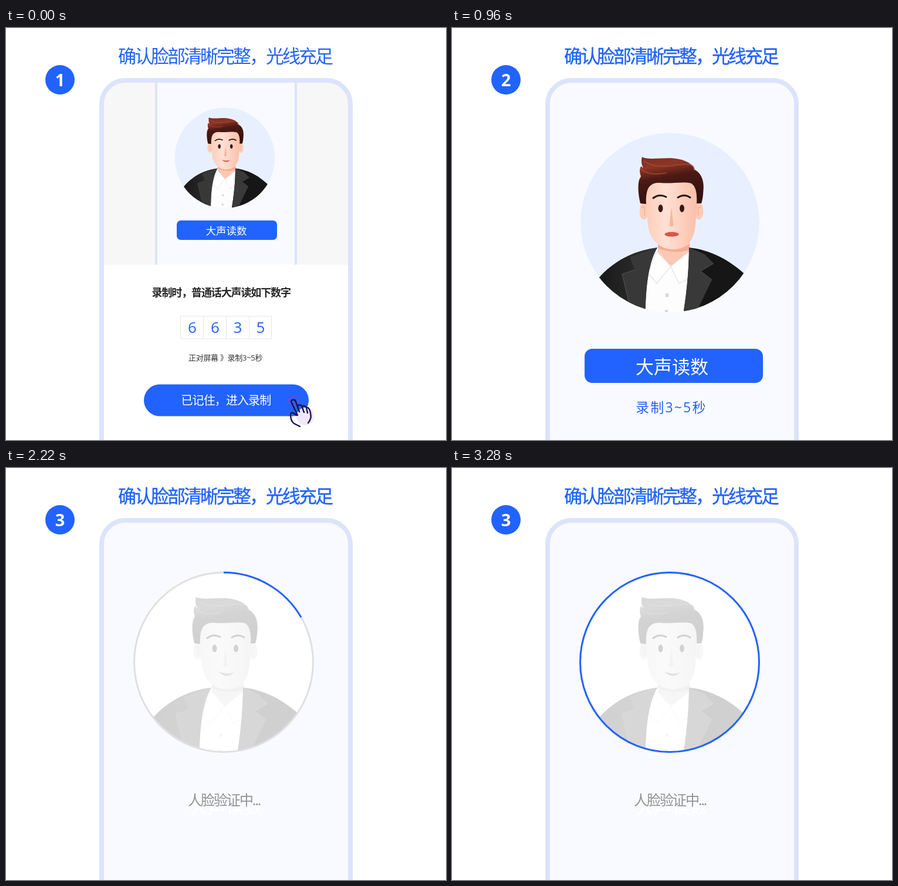
An HTML page that plays this animation: 750 px wide and 700 px high, repeating every 3.61 s.

```html
<!DOCTYPE html>
<html lang="zh-CN">
<head>
<meta charset="utf-8">
<title>录制步骤</title>
<style>
html, body { margin: 0; width: 100%; height: 100%; overflow: hidden; background: #fff; }
svg { display: block; width: 750px; height: 700px; }
text { font-family: "Open Sans", "Noto Sans CJK SC", "Noto Sans CJK", sans-serif; white-space: pre; }
.blue { fill: #2263ff; }
.white { fill: #fff; }
.line { fill: none; stroke-linecap: round; stroke-linejoin: round; }
.grey { filter: grayscale(1); opacity: .2; }
#title { font-size: 31px; letter-spacing: -3px; stroke: #2263ff; }
#badge { font-size: 29px; font-weight: 700; text-anchor: middle; }
</style>
</head>
<body>
<svg viewBox="0 0 750 700">
<defs>
  <linearGradient id="hair" x1="0" y1="0" x2=".25" y2="1">
    <stop offset="0" stop-color="#7c2a1d"/><stop offset=".25" stop-color="#8e3626"/>
    <stop offset=".5" stop-color="#4b1a14"/><stop offset="1" stop-color="#34100e"/>
  </linearGradient>
  <linearGradient id="skin">
    <stop offset="0" stop-color="#fdcdb9"/><stop offset=".4" stop-color="#ffe0d4"/>
    <stop offset="1" stop-color="#fabfa8"/>
  </linearGradient>
  <linearGradient id="cloth">
    <stop offset="0" stop-color="#151515"/><stop offset="1" stop-color="#343434"/>
  </linearGradient>
  <clipPath id="small"><circle cx="373" cy="220.5" r="85.5"/></clipPath>
  <clipPath id="large"><circle cx="371.5" cy="330.5" r="152.5"/></clipPath>
  <clipPath id="screen"><rect x="163" y="89" width="424" height="700" rx="40"/></clipPath>

  <g id="person">
    <path fill="#fdfdfd" d="M350 373L404 373L404 520H326V420Z"/>
    <path fill="#fbc8b3" d="M351 360V380L373 406L405 380V360Z"/>
    <path fill="#f5ac92" d="M351 367Q378 384 405 367V377Q378 385 351 374Z"/>
    <path fill="#fff" stroke="#e2e2e2" stroke-width="1.2" d="M349 379L334 416L349 434L373 405ZM405 379L403 425L387 434L373 405Z"/>
    <path fill="#d6d6d6" d="M364 451h5v6h-5zM363 479h5v6h-5z"/>
    <path fill="url(#cloth)" d="M350 373C310 378 268 397 238 440V520H329C330 470 328 410 350 373Z"/>
    <path fill="#383838" d="M350 373L303 389L312 411L290 418L302 468L308 520H329C330 480 328 410 350 373Z"/>
    <path class="line" stroke="#555" d="M312 411L290 418L302 468"/>
    <path fill="#161616" d="M404 373C440 377 475 394 505 424L520 520H388C398 470 404 420 404 373Z"/>
    <path fill="#393939" d="M404 373L430 384L446 400L424 413L443 428L408 500L402 520H388C398 470 404 420 404 373Z"/>
    <path class="line" stroke="#505050" d="M446 400L424 413L443 428"/>
    <g fill="#fdcbb7">
      <ellipse cx="327" cy="311" rx="7.5" ry="14.5"/><ellipse cx="421" cy="311" rx="7.5" ry="14.5"/>
    </g>
    <path class="line" stroke="#f4ad94" stroke-width="1.5" d="M324 305Q330 301 328 318M424 305Q418 301 420 318"/>
    <path fill="url(#skin)" d="M330 300C329 268 338 258 355 258H398C412 258 418 272 418 300L415 332C414 358 402 376 377 376C351 376 336 356 334 334Z"/>
    <path fill="url(#hair)" d="M324 219C332 224 350 221 372 221C395 222 410 230 414 241C424 246 430 258 428.500 275C428 288 426 295 425 298L417 298C418 283 416 269 408 264C395 260 375 265 355 263C342 262 334 268 332 280C330 290 331 296 331 299L321 298C318 285 316 270 319 258L322 252C320 247 319 241 322 235L326 238C323 232 322 225 324 219Z"/>
    <path class="line" stroke="#b0503a" stroke-width="2" opacity=".65" d="M327 226Q345 239 380 233T412 241M323 240Q335 252 365 246"/>
    <path class="line" stroke="#2b1512" stroke-width="3" d="M343 289Q353 281 365 287M385 288Q396 281 406 288"/>
    <g fill="#3b1814">
      <ellipse cx="355.500" cy="306.500" rx="4" ry="6.500"/><ellipse cx="392" cy="306.500" rx="4" ry="6.500"/>
    </g>
    <path fill="#f7b49c" d="M374 304L370.500 335Q374 340 377.500 335Z"/>
  </g>
  <g id="smiling">
    <use href="#person"/>
    <path fill="#d9584b" d="M362 346Q376 352 389 347Q376 360 362 346Z"/>
  </g>
</defs>

<rect width="750" height="700" fill="#fff"/>
<text id="title" class="blue" x="191" y="59">确认脸部清晰完整，光线充足</text>
<circle class="blue" cx="92" cy="88" r="25"/>
<text id="badge" class="white" x="92" y="99"></text>
<rect x="163" y="89" width="424" height="700" rx="40" fill="#f9faff"/>

<g class="scene">
  <g clip-path="url(#screen)">
    <rect x="163" y="89" width="424" height="313" fill="#f7f7f7"/>
    <rect x="254" y="89" width="242" height="313" fill="#dce4fb"/>
    <rect x="258" y="89" width="234" height="313" fill="#f9faff"/>
    <rect class="white" x="163" y="402" width="424" height="300"/>
  </g>
  <g clip-path="url(#small)">
    <circle cx="373" cy="220.500" r="85.500" fill="#e8f0ff"/>
    <use href="#smiling" transform="translate(163.700 28.800) scale(.5625)"/>
  </g>
  <rect class="blue" x="291" y="327" width="171" height="33" rx="7"/>
  <text class="white" x="340.500" y="350.500" font-size="17.500">大声读数</text>
  <text x="248.500" y="456" font-size="18" font-weight="700" letter-spacing="-1.120" fill="#262626">录制时，普通话大声读如下数字</text>
  <path fill="none" stroke="#e6e6e6" d="M297.500 489.500H452.500V528H297.500ZM336.500 489.500V528M375.500 489.500V528M414.500 489.500V528"/>
  <g class="blue" font-size="26" text-anchor="middle">
    <text x="317.500" y="518">6</text><text x="356.500" y="518">6</text>
    <text x="395" y="518">3</text><text x="434" y="518">5</text>
  </g>
  <text x="311" y="565" font-size="13" letter-spacing="-.300" fill="#333">正对屏幕 》录制3~5秒</text>
  <rect class="blue" x="235" y="605.500" width="281" height="54" rx="27"/>
  <text class="white" x="298.500" y="640" font-size="20" letter-spacing="-.900">已记住，进入录制</text>
  <g id="hand">
    <circle cx="510" cy="660" r="15" fill="#f1e7fd"/>
    <circle id="ripple" cx="490" cy="634" r="8" fill="none" stroke="#b62fb4" stroke-width="2" stroke-dasharray="2 1.500" opacity=".8"/>
    <path class="line" stroke="#1b124f" stroke-width="2.400" d="M497 658L487 637Q485 632 489 631.500Q493 631 494 635L500 652M497 643Q500 638 504 642L508 653M505 643Q509 640 512 645L514 654M512 645Q516 644 518 650C521 660 520 665 515 671M495 658Q486 650 485 656Q485 668 491 672L501 677"/>
  </g>
</g>

<g class="scene">
  <g clip-path="url(#large)">
    <circle cx="371.500" cy="330.500" r="152.500" fill="#e8f0ff"/>
    <use href="#person"/>
    <ellipse id="mouth" cx="374.500" cy="350.500" fill="#d4574f"/>
  </g>
  <rect class="blue" x="226" y="545" width="304" height="58" rx="13"/>
  <text class="white" x="313" y="586.500" font-size="31">大声读数</text>
  <text class="blue" x="313" y="652.500" font-size="23" letter-spacing="2.200">录制3~5秒</text>
</g>

<g class="scene">
  <circle class="white" cx="371" cy="330" r="152.500"/>
  <g clip-path="url(#large)"><use class="grey" href="#smiling"/></g>
  <g fill="none" stroke-width="3" transform="rotate(-90 371 330)">
    <circle cx="371" cy="330" r="152.500" stroke="#e0e0e0"/>
    <circle id="arc" cx="371" cy="330" r="152.500" stroke="#2263ff" pathLength="6"/>
  </g>
  <text class="white" x="313" y="586.500" font-size="31">大声读数</text>
  <rect x="300" y="545" width="150" height="32" fill="#f9faff"/>
  <text x="310" y="573" font-size="24" letter-spacing="-2" fill="#929292">人脸验证中...</text>
</g>

<rect x="163" y="89" width="424" height="700" rx="40" fill="none" stroke="#dce4fb" stroke-width="8"/>
</svg>
<script>
const $ = id => document.getElementById(id);
const set = (el, attrs) => { for (const k in attrs) el.setAttribute(k, attrs[k]); };
const scenes = [...document.querySelectorAll('.scene')];
const LOOP = 3610, start = performance.now();
const passed = (t, times) => times.filter(s => t >= s).length;

function draw() {
  const t = (performance.now() - start) % LOOP;
  const step = passed(t, [960, 2220]);
  scenes.forEach((s, i) => s.style.display = i === step ? '' : 'none');
  $('badge').textContent = step + 1;
  $('title').style.strokeWidth = t < 300 ? 0 : .4;

  const lifted = t >= 300 && t < 630;
  set($('hand'), { transform: lifted ? 'translate(8 8)' : '' });
  set($('ripple'), { visibility: lifted ? 'hidden' : 'inherit' });

  const open = passed(t, [1290, 1620, 1890]) % 2;
  set($('mouth'), open ? { rx: 9, ry: 6 } : { rx: 12, ry: 4 });

  const sixths = 1 + passed(t, [2420, 2620, 2850, 3080, 3280]);
  set($('arc'), { 'stroke-dasharray': sixths < 6 ? sixths + ' 6' : 'none' });
  requestAnimationFrame(draw);
}
draw();
</script>
</body>
</html>
```
